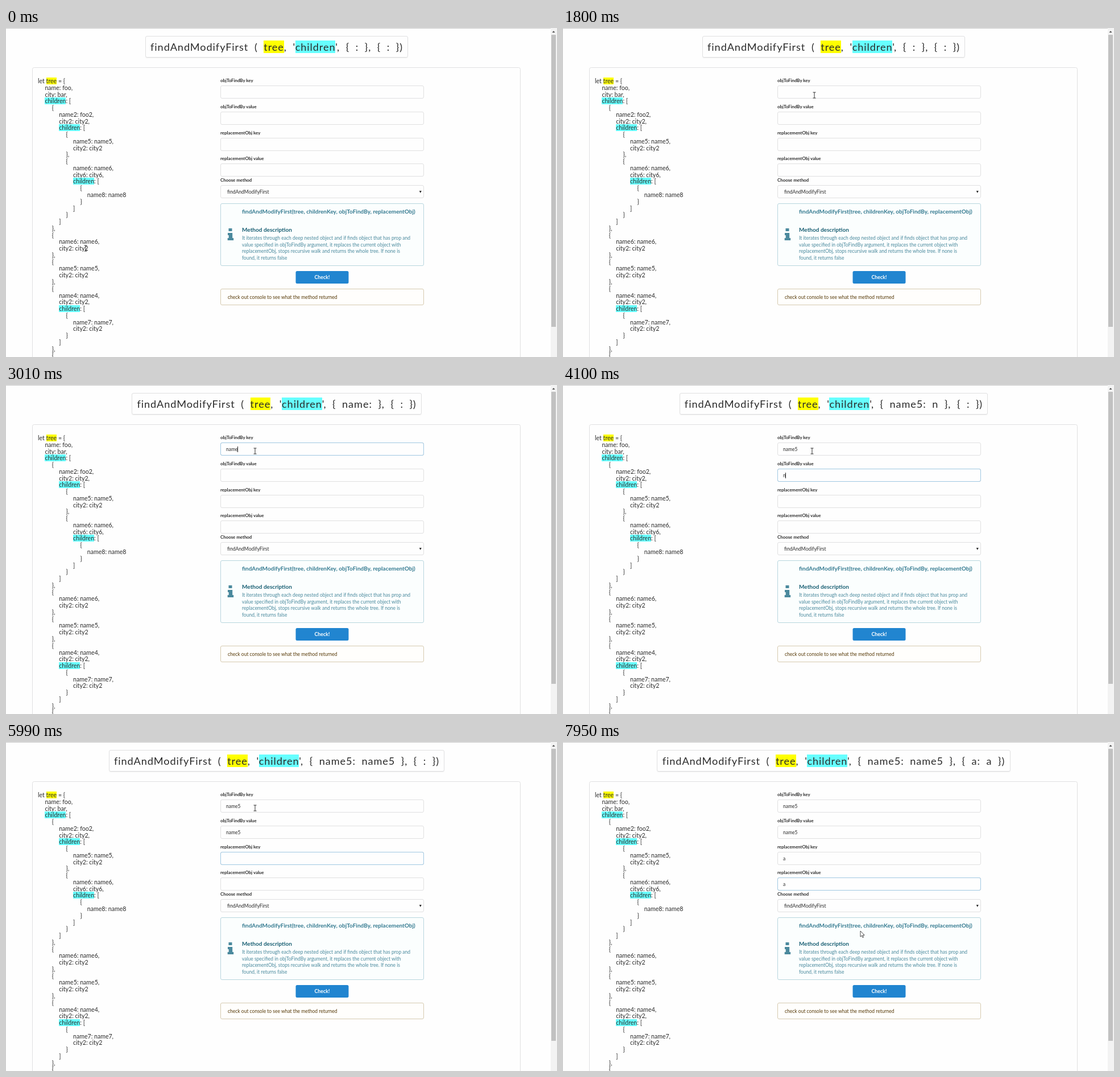
These frames come from a looping animation (969 by 578 pixels, 8000 ms). An HTML page:

```html
<!DOCTYPE html>
<html lang="en">
<head>
<meta charset="utf-8">
<title>findAndModifyFirst demo</title>
<style>
  html, body { margin: 0; width: 100%; height: 100%; overflow: hidden; background: #fefefe; }
  body { position: relative; font-family: Lato, sans-serif; color: #2b2b2b; }
  svg { position: absolute; left: 0; top: 0; font-size: 8.5px; fill: #2b2b2b; }
  mark { background: #6ff; color: inherit; }
  mark.tree { background: #ff0; }
  #title { position: absolute; left: 0; top: 14px; width: 952px; display: flex; justify-content: center; }
  #call {
    display: flex; align-items: center; column-gap: 10.6px; box-sizing: border-box; height: 38px;
    padding: 0 8.3px; border: 1px solid #e0e0e1; border-radius: 3px; box-shadow: 0 1px 1px #0001;
    font-size: 18.17px; letter-spacing: .91px; white-space: nowrap;
  }
  #call span:empty { display: none; }
  #code { position: absolute; left: 56px; top: 88px; font-size: 10.6px; line-height: 11.77px; white-space: pre; }
  .box { fill: none; stroke: #e0e0e1; }
  .focus { fill: none; stroke: #a0c8e2; }
  .bold { font-weight: 700; }
  .head { font-weight: 700; font-size: 10.04px; }
  .info { fill: #4a899d; }
</style>
</head>
<body>
<svg id="page" width="969" height="578">
  <path d="M0 .5H958" stroke="#ccc"/>
  <rect x="958" width="11" height="578" fill="#f3f3f3"/>
  <rect x="959" y="12" width="8" height="513" fill="#c1c1c1"/>
  <path d="M960.5 8l2.5-3 2.5 3z" fill="#505050"/>
  <rect class="box" x="46.5" y="69.5" width="858" height="530" rx="3"/>

  <g id="form"></g>
  <text class="bold" x="377" y="270" font-size="7.87">Choose method</text>
  <rect class="box" x="377.5" y="276.5" width="357" height="22" rx="2.5"/>
  <text x="389" y="291" font-size="8.6">findAndModifyFirst</text>
  <path d="M726.8 286h4l-2 4z"/>

  <rect x="377.5" y="308.5" width="357" height="109" rx="2.5" fill="#fbfefe" stroke="#b8d6de"/>
  <text class="head" x="415" y="325.5" fill="#347a90">findAndModifyFirst(tree, childrenKey, objToFindBy, replacementObj)</text>
  <path class="info" d="M391.5 352h6v5h-6zM390 360h8.2v9h2v4h-10.5v-4h2v-5H390z"/>
  <text class="head" x="415" y="358" fill="#1a6074">Method description</text>
  <g class="info">
    <text x="415" y="371.8">It iterates through each deep nested object and if finds object that has prop and</text>
    <text x="415" y="383.5">value specified in objToFindBy argument, it replaces the current object with</text>
    <text x="415" y="395.3">replacementObj, stops recursive walk and returns the whole tree. If none is</text>
    <text x="415" y="407">found, it returns false</text>
  </g>

  <rect x="509.5" y="427" width="93" height="22" rx="2.5" fill="#2185d0"/>
  <text class="bold" x="556" y="441" font-size="8.8" text-anchor="middle" fill="#fff">Check!</text>
  <rect x="377.5" y="458.5" width="357" height="28" rx="2.5" fill="#fffefc" stroke="#d6cab0"/>
  <text x="390" y="475.7" fill="#573a08">check out console to see what the method returned</text>
</svg>

<div id="title"><div id="call">
  <span>findAndModifyFirst</span><span>(</span>
  <span><mark class="tree">tree</mark>,</span><span>'<mark>children</mark>',</span>
  <span>{</span><span class="arg"></span><span class="arg"></span><span>},</span>
  <span>{</span><span class="arg"></span><span class="arg"></span><span>})</span>
</div></div>

<div id="code"></div>

<svg width="969" height="578">
  <path id="caret" d="M.5 0v10" stroke="#222"/>
  <g id="cursor">
    <circle id="ring" r="6" fill="#8883" stroke="#555"/>
    <path id="beam" d="M-2.5-5h5M0-5V5M-2.5 5h5" fill="none" stroke="#333"/>
    <path id="arrow" d="M0 0V10.2L2.4 8l1.6 3.6 1.6-.7L4 7.3h3.2z" fill="#fff" stroke="#222" stroke-width=".8"/>
  </g>
</svg>

<script>
const LOOP = 8000, BLINK = 530, FADE = 100;
const $ = id => document.getElementById(id);
const clamp = v => Math.min(1, Math.max(0, v));
const show = (el, on) => el.style.display = on ? '' : 'none';

const fields = [
  { label: 'objToFindBy key', text: 'name5', focus: 1940, keys: [2710, 2750, 2920, 3010, 3350] },
  { label: 'objToFindBy value', text: 'name5', focus: 3840, keys: [4100, 4200, 4320, 4430, 4920] },
  { label: 'replacementObj key', text: 'a', focus: 5460, keys: [6630] },
  { label: 'replacementObj value', text: 'a', focus: 6980, keys: [7310] },
];
const events = fields.flatMap(f => [f.focus, ...f.keys]);

// Cursor waypoints: time, x, y
const path = [
  [60, 140, 387], [420, 104, 433], [760, 112, 424], [930, 112, 424], [1030, 116, 423],
  [1130, 108, 421], [1690, 444, 119], [1740, 444, 119], [1900, 438, 116],
  [7780, 438, 116], [7950, 523, 332],
];

const source = `let tree = {|name: foo,|city: bar,|children: [|{|name2: foo2,|city2: city2,|children: [|{
|name5: name5,|city2: city2|},|{|name6: name6,|city6: city6,|children: [|{|name8: name8|}|]|}|]|},|{
|name6: name6,|city2: city2|},|{|name5: name5,|city2: city2|},|{|name4: name4,|city2: city2,|children: [|{
|name7: name7,|city2: city2|}|]|},|{`;

let depth = 0;
$('code').innerHTML = source.replace(/\n/g, '').split('|').map(line => {
  if (/^[}\]]/.test(line)) depth--;
  const html = line.replace('children', '<mark>$&</mark>').replace('tree', '<mark class="tree">$&</mark>');
  const row = `<div style="padding-left:${12.4 * depth}px">${html}</div>`;
  if (/[{[]$/.test(line)) depth++;
  return row;
}).join('');

const fieldTop = i => 101 + Math.round(45.8 * i);
$('form').innerHTML = fields.map((f, i) => {
  const y = fieldTop(i), rect = `x="377.5" y="${y + .5}" width="357" height="22" rx="2.5"`;
  return `<text class="bold" x="377" y="${y - 6}" font-size="7.87">${f.label}</text>
    <rect class="box" ${rect}/><rect class="focus" ${rect}/>
    <text class="value" x="387" y="${y + 14.6}"></text>`;
}).join('');
const glows = document.querySelectorAll('.focus');
const values = document.querySelectorAll('.value');
const args = document.querySelectorAll('.arg');

function cursorAt(t) {
  const next = path.findIndex(p => p[0] > t);
  if (next === 0) return path[0].slice(1);
  if (next < 0) return path[path.length - 1].slice(1);
  const [t0, x0, y0] = path[next - 1], [t1, x1, y1] = path[next];
  const u = (t - t0) / (t1 - t0), e = u * u * (3 - 2 * u);
  return [x0 + (x1 - x0) * e, y0 + (y1 - y0) * e];
}

function render(t) {
  let active = -1;
  fields.forEach((f, i) => {
    const typed = f.text.slice(0, f.keys.filter(k => k <= t).length);
    const blur = fields[i + 1]?.focus ?? Infinity;
    values[i].textContent = typed;
    args[i].textContent = i % 2 ? typed : typed + ':';
    glows[i].style.opacity = clamp((t - f.focus) / FADE) - clamp((t - blur) / FADE);
    if (t >= f.focus) active = i;
  });

  const last = Math.max(...events.filter(e => e <= t));
  show($('caret'), active >= 0 && (t - last) % (2 * BLINK) < BLINK);
  if (active >= 0) {
    const x = Math.floor(386.6 + values[active].getComputedTextLength());
    $('caret').setAttribute('transform', `translate(${x} ${fieldTop(active) + 7})`);
  }

  const [x, y] = cursorAt(t);
  const overText = x < 212 || (x > 377 && y < 262);
  $('cursor').setAttribute('transform', `translate(${x} ${y})`);
  show($('beam'), overText);
  show($('arrow'), !overText);
  show($('ring'), t >= 1000 && t < 1130);
}

const start = performance.now();
function tick() {
  render((performance.now() - start) % LOOP);
  requestAnimationFrame(tick);
}
tick();
</script>
</body>
</html>
```
